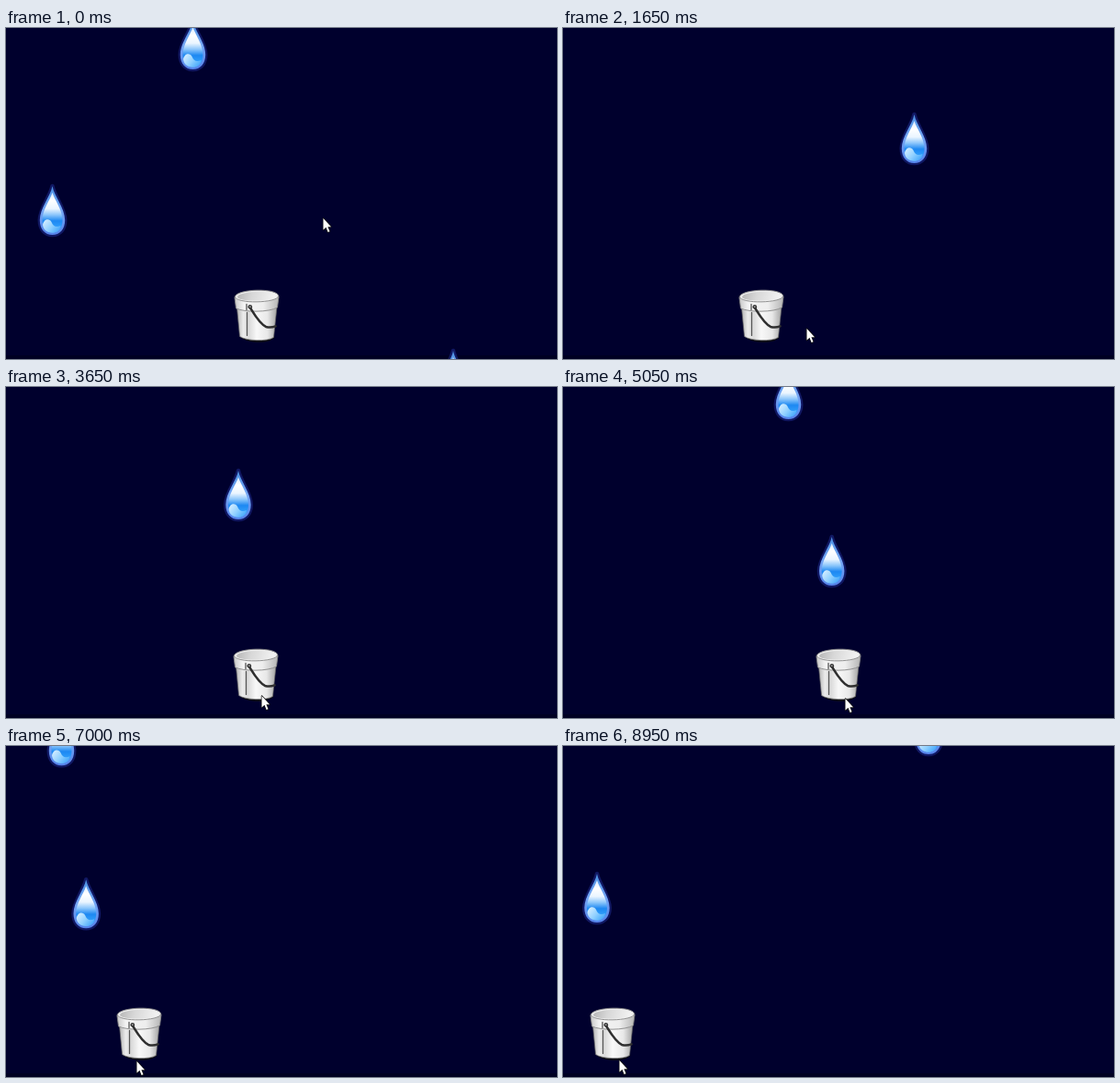
Recreate the animation shown at these times as an HTML page with a canvas. Size 600 by 360 pixels, loop 9000 ms.

```html
<!DOCTYPE html>
<html lang="en">
<head>
<meta charset="utf-8">
<title>Catch the drops</title>
<style>
  html, body { margin: 0; width: 100%; height: 100%; overflow: hidden; background: #00002d; }
  canvas { display: block; }
</style>
</head>
<body>
<canvas id="stage" width="600" height="360"></canvas>
<script>
const ctx = document.getElementById('stage').getContext('2d');
const LOOP = 9, STEP = 0.05;
const FALL_SPEED = 176, CATCH_TOP = 227;

// Falling drops: centre x, a moment in seconds, top y at that moment, caught or not.
const drops = [
  [487, 0, 350, false], [50.5, 0, 171, false], [203.5, 0, -9, true],
  [382.5, 1.65, 93, true], [262, 3.65, 271, true], [253, 3.65, 90, true],
  [292.7, 5.05, 162, true], [245.5, 6.3, 201, true], [87.2, 6.3, 21, true],
  [60.5, 7.8, 108, true], [37, 8.95, 138, true], [398, 8.95, -45, true]
];

// Pointer path: time in seconds, x, y.
const pointerPath = [
  [0, 345, 206], [0.9, 211, 318], [1.55, 211, 326], [1.6, 223, 326],
  [1.65, 265, 326], [1.85, 385, 330], [2.05, 395, 333], [2.45, 395, 334],
  [2.85, 325, 334], [3.1, 279, 334], [3.6, 279, 335], [3.65, 278, 335],
  [4.75, 284, 338], [5, 307, 338], [5.7, 307, 339], [6.2, 258, 339],
  [6.45, 258, 339], [6.65, 212, 341], [7.25, 92, 342], [7.6, 92, 342],
  [7.75, 81, 342], [7.8, 78, 342], [8.2, 61, 341], [9, 61, 341]
];

function pointerAt(time) {
  const t = Math.max(0, time);
  const i = pointerPath.findIndex(key => key[0] > t);
  const [t0, x0, y0] = pointerPath[i - 1], [t1, x1, y1] = pointerPath[i];
  const k = (t - t0) / (t1 - t0);
  return { x: x0 + (x1 - x0) * k, y: y0 + (y1 - y0) * k };
}

// The bucket trails the pointer by one step once the pointer has reached it.
function bucketCentre(time) {
  const x = pointerAt(time - STEP).x - 7;
  return time < 1 ? Math.min(273, x) : x;
}

function gradient(x0, y0, x1, y1, stops) {
  const g = ctx.createLinearGradient(x0, y0, x1, y1);
  stops.forEach(([at, color]) => g.addColorStop(at, color));
  return g;
}

function fill(path, style) {
  ctx.fillStyle = style;
  ctx.fill(path);
}

function stroke(path, style, width) {
  ctx.strokeStyle = style;
  ctx.lineWidth = width;
  ctx.stroke(path);
}

function at(x, y, draw) {
  ctx.save();
  ctx.translate(x, y);
  draw();
  ctx.restore();
}

const dropShape = new Path2D('M0 1C2 12 13.7 25 13.7 38C13.7 48 8 54 0 54C-8 54-13.7 48-13.7 38C-13.7 25-2 12 0 1Z');
const dropBody = new Path2D('M0 8C3 17 11 27 11 38C11 46 7 51.5 0 51.5C-7 51.5-11 46-11 38C-11 27-3 17 0 8Z');
const dropSwirl = new Path2D('M-10.5 43C-9 36-3 36-1 40C1 45 4 46 9 44C8 49 5 51.5 0 51.5C-6 51.5-10 48-10.5 43Z');

function drawDrop() {
  ctx.lineJoin = 'round';
  stroke(dropShape, 'rgba(50,70,200,.35)', 4.5);
  fill(dropShape, gradient(0, 0, 0, 55, [[0, '#4a90e2'], [.5, '#74a6f4'], [1, '#5482ea']]));
  fill(dropBody, gradient(0, 8, 0, 52,
    [[0, '#d6eaff'], [.2, '#fff'], [.4, '#eaf5ff'], [.55, '#8cc6fb'], [.7, '#1d88f2'], [.85, '#2f9dfa'], [1, '#70c8ff']]));
  fill(dropSwirl, gradient(-8, 38, 7, 51, [[0, '#d2ecff'], [.5, '#8fd0ff'], [1, '#3fa5fb']]));
}

const bucketBody = new Path2D('M-21.5 20L-18.5 51C-12 56 12 57 18.5 52L22 19Z');
const bucketBand = new Path2D('M-24 9L-22.5 20.5C-14 25 14 25 22.5 19.5L24 8Z');
const bucketRim = new Path2D('M-23.7 8C-23-1 23-2 23.7 7C23 15 -23 16 -23.7 8Z');
const bucketInside = new Path2D('M-21 8C-20 1.5 20 .5 21 7C20 13 -20 14 -21 8Z');
const bucketSeam = new Path2D('M-11 16V22M-10.5 25V50');
const bucketHandle = new Path2D('M-7 20C-2 28 3 37 10 40.5Q15 42 20.5 40');
const bucketPivot = new Path2D('M-9.5 18.8a2.3 2.3 0 1 0 4.6 0a2.3 2.3 0 1 0-4.6 0');
const bucketShadow = new Path2D('M-17 52C-10 58.5 14 59.5 19.5 52L18 48H-18Z');

function drawBucket() {
  ctx.lineCap = ctx.lineJoin = 'round';
  fill(bucketShadow, '#0c0c12');
  fill(bucketBody, gradient(-21, 0, 21, 0,
    [[0, '#b8b8b8'], [.15, '#ebebeb'], [.3, '#dadada'], [.5, '#f8f8f8'], [.78, '#e8e8e8'], [1, '#aaa']]));
  stroke(bucketBody, '#666', .7);
  fill(bucketBand, gradient(-24, 0, 24, 0,
    [[0, '#c8c8c8'], [.2, '#f3f3f3'], [.65, '#eee'], [1, '#b5b5b5']]));
  stroke(bucketBand, '#888', .9);
  fill(bucketRim, '#eee');
  stroke(bucketRim, '#888', .9);
  fill(bucketInside, gradient(-20, 3, 18, 13, [[0, '#b8b8b8'], [.4, '#d8d8d8'], [1, '#f2f2f2']]));
  stroke(bucketSeam, '#555', 1.3);
  stroke(bucketHandle, '#303030', 2.6);
  fill(bucketPivot, '#333');
  ctx.fillStyle = '#aaa';
  ctx.fillRect(-8, 18, 1.5, 1.5);
}

const arrow = new Path2D('M0 0V12.5L3 9.8L5.1 15L7 14.2L4.9 9.2H8.5Z');

function drawPointer() {
  ctx.lineJoin = 'round';
  stroke(arrow, '#111', 1.4);
  fill(arrow, '#fff');
}

function render(time) {
  ctx.fillStyle = '#00002d';
  ctx.fillRect(0, 0, 600, 360);
  ctx.fillStyle = '#000022';
  ctx.fillRect(0, 356, 600, 4);

  at(bucketCentre(time), 284.4, drawBucket);
  for (const [x, when, y, caught] of drops) {
    const top = y + (time - when) * FALL_SPEED;
    if (top > -58 && top < (caught ? CATCH_TOP : 360)) at(x, top, drawDrop);
  }
  const pointer = pointerAt(time);
  at(Math.round(pointer.x) + .5, Math.round(pointer.y) + 1, drawPointer);
}

function frame() {
  const ticks = Math.floor(performance.now() / (STEP * 1000));
  render(ticks % Math.round(LOOP / STEP) * STEP);
  requestAnimationFrame(frame);
}
frame();
</script>
</body>
</html>
```
